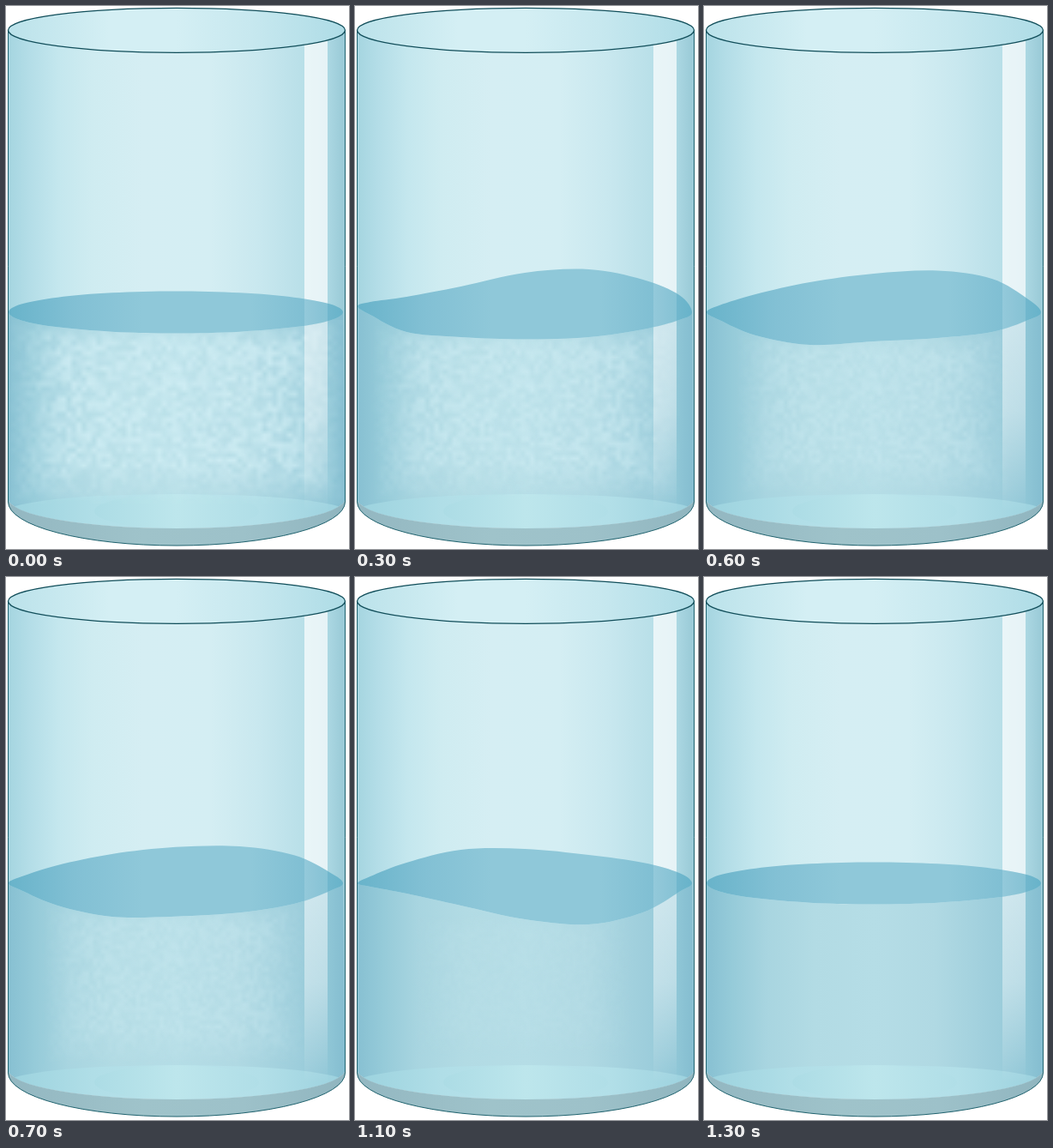
An HTML page with a canvas that plays this animation: 400 by 633 pixels, repeating every 1400 ms.

```html
<!DOCTYPE html>
<html lang="en">
<head>
<meta charset="utf-8">
<title>Water in a glass</title>
<style>
html, body { margin: 0; height: 100%; overflow: hidden; background: #fff; }
canvas { display: block; width: 400px; height: 633px; }
</style>
</head>
<body>
<canvas id="stage" width="400" height="633"></canvas>
<script>
const ctx = document.getElementById('stage').getContext('2d');
const LEFT = 2.5, RIGHT = 395.5, MID = 199, RX = 196.5;
const STEPS = 14, STEP_MS = 100;

// Surface outlines: 9 heights along the back (left to right), 7 along the front (right to left).
const flat = Array.from({ length: 16 }, (_, i) => 357 - 24.5 * Math.sin(Math.PI * i / 8));
const rise = [357, 348, 334, 324.5, 327, 337, 343, 347, 357, 366, 382, 398, 399, 388, 373, 365];
const right = [350, 345, 339, 327, 311, 307, 319, 337, 357, 366, 377, 386, 388.5, 386, 380, 360];
const lean = [357, 349, 336, 322, 312, 308.5, 318, 342, 357, 366, 380, 387, 391, 395, 384, 366];
const swell = [357, 350, 336, 325, 320.5, 325, 337, 350, 357, 365, 383, 400, 405, 398, 381, 364];
const left = [357, 349, 333, 318, 317, 324, 333, 345, 357, 367, 391, 405, 399, 383, 369, 361];
const keys = [[0, flat], [1, rise], [3, right], [6, lean], [9, swell], [11, left], [12, right], [13, flat]];

function surface(step) {
  const n = Math.max(1, keys.findIndex(key => key[0] >= step));
  const [t0, a] = keys[n - 1], [t1, b] = keys[n];
  const f = (step - t0) / (t1 - t0);
  return a.map((y, i) => [198 - 195 * Math.cos(Math.PI * i / 8), y + (b[i] - y) * f]);
}

// Smooth closed curve through the points, from one index to another.
function trace(path, pts, from, to) {
  const p = i => pts[(i + 16) % 16];
  path.moveTo(...p(from));
  for (let i = from; i < to; i++) {
    const [a, b, c, d] = [p(i - 1), p(i), p(i + 1), p(i + 2)];
    path.bezierCurveTo(b[0] + (c[0] - a[0]) / 6, b[1] + (c[1] - a[1]) / 6,
      c[0] - (d[0] - b[0]) / 6, c[1] - (d[1] - b[1]) / 6, ...c);
  }
}

function shade(stops, vertical, from = LEFT, to = RIGHT) {
  const g = vertical ? ctx.createLinearGradient(0, from, 0, to) : ctx.createLinearGradient(from, 0, to, 0);
  stops.forEach(([at, colour]) => g.addColorStop(at, colour));
  return g;
}

function oval(cx, cy, rx, ry) {
  const path = new Path2D();
  path.ellipse(cx, cy, rx, ry, 0, 0, 7);
  return path;
}

function fill(path, style) {
  ctx.fillStyle = style;
  ctx.fill(path);
}

function inside(path, draw) {
  ctx.save();
  ctx.clip(path);
  draw();
  ctx.restore();
}

function strip(style) {
  ctx.fillStyle = style;
  ctx.fillRect(348, 0, 27, 633);
}

// Lower edges of the glass: inner floor line and outer bottom.
const floorLine = path => path.ellipse(MID, 574, RX, 35, 0, Math.PI, 0, true);

const rim = oval(MID, 28.3, RX, 26);

const wall = new Path2D();
wall.moveTo(RIGHT, 28.3);
wall.ellipse(MID, 28.3, RX, 26, 0, 0, Math.PI);
wall.lineTo(LEFT, 574);
floorLine(wall);
wall.closePath();

const base = new Path2D();
base.moveTo(LEFT, 574);
floorLine(base);
base.lineTo(RIGHT, 578);
base.ellipse(MID, 578, RX, 51, 0, 0, Math.PI);
base.closePath();

const outline = new Path2D();
outline.moveTo(LEFT, 28.3);
outline.lineTo(LEFT, 578);
outline.ellipse(MID, 578, RX, 51, 0, Math.PI, 0, true);
outline.lineTo(RIGHT, 28.3);

const rimShade = shade([[0, '#bbe2ea'], [.3, '#d4eff4'], [.5, '#d4eff4'], [.72, '#c7e8ef'], [1, '#aedce6']]);
const wallShade = shade([[0, '#a5d5e0'], [.06, '#b3dde7'], [.15, '#c4e7ee'], [.25, '#cfecf1'], [.4, '#d5eef3'],
  [.6, '#d4eef3'], [.74, '#c9e8ef'], [.88, '#b8dfe8'], [.95, '#abd7e2'], [1, '#98c9d6']]);
const waterShade = shade([[0, '#87c0d2'], [.08, '#96cbd9'], [.18, '#a8d5e0'], [.32, '#b2dbe4'],
  [.5, '#b5dde6'], [.68, '#b0d9e3'], [.87, '#9ccddb'], [.95, '#8fc6d6'], [1, '#84bdd0']]);
const topShade = shade([[0, '#68b3ca'], [.2, '#82c0d4'], [.4, '#8fc8d9'], [.72, '#8fc8d9'], [.88, '#80bfd3'], [1, '#66b2c9']]);
const floorShade = shade([[0, '#9bd2de'], [.25, '#b0dee7'], [.5, '#b9e2ea'], [.75, '#b2dfe8'], [1, '#9bd1de']]);
const dimpleShade = shade([[0, '#acdce5'], [.5, '#bde6ec'], [1, '#b0dee7']], false, 103, 296);
const baseShade = shade([[0, '#93b7c1'], [.4, '#9fc3ca'], [.7, '#9dc1c9'], [1, '#90b5bf']]);
const wetGlint = shade([[0, 'rgba(255,255,255,.55)'], [.5, 'rgba(255,255,255,.4)'], [1, 'rgba(255,255,255,0)']], true, 355, 590);

// Cloud of tiny bubbles: soft random grains, fading at its border.
function makeCloud(w, h) {
  const cloud = document.createElement('canvas');
  cloud.width = w;
  cloud.height = h;
  const c = cloud.getContext('2d');
  let seed = 11;
  const random = () => (seed = seed * 16807 % 2147483647) / 2147483647;
  for (let y = 0; y < h; y++) {
    for (let x = 0; x < w; x++) {
      const edge = Math.min(1, (x + .5) / 12, (w - x - .5) / 12, (y + .5) / 5, (h - y - .5) / 8);
      c.fillStyle = `rgba(212,240,246,${(.2 + .6 * random()) * edge})`;
      c.fillRect(x, y, 1, 1);
    }
  }
  return cloud;
}
const cloud = makeCloud(68, 36);

function draw(step) {
  ctx.fillStyle = '#fff';
  ctx.fillRect(0, 0, 400, 633);
  fill(rim, rimShade);
  fill(wall, wallShade);
  inside(wall, () => strip('rgba(255,255,255,.7)'));

  const pts = surface(step);
  const top = new Path2D();
  trace(top, pts, 0, 16);
  const water = new Path2D();
  trace(water, pts, 8, 16);
  water.lineTo(LEFT, 574);
  floorLine(water);
  water.closePath();

  fill(water, waterShade);
  inside(water, () => {
    fill(oval(MID, 589, RX, 20), floorShade);
    fill(oval(MID, 589, 96, 20), dimpleShade);
    ctx.globalAlpha = 1 - step / 13;
    ctx.drawImage(cloud, 6 * step, 366 + 2.3 * step, 398 - 12.5 * step, 214 - 4 * step);
    ctx.globalAlpha = 1;
    strip(wetGlint);
  });
  fill(top, topShade);
  inside(top, () => strip('rgba(255,255,255,.15)'));

  fill(base, baseShade);
  ctx.lineWidth = 1;
  ctx.strokeStyle = '#1f626e';
  ctx.stroke(outline);
  ctx.lineWidth = 1.3;
  ctx.strokeStyle = '#114e5a';
  ctx.stroke(rim);
}

let shown = -1;
function tick() {
  const step = Math.floor(performance.now() / STEP_MS) % STEPS;
  if (step !== shown) draw(shown = step);
  requestAnimationFrame(tick);
}
tick();
</script>
</body>
</html>
```
